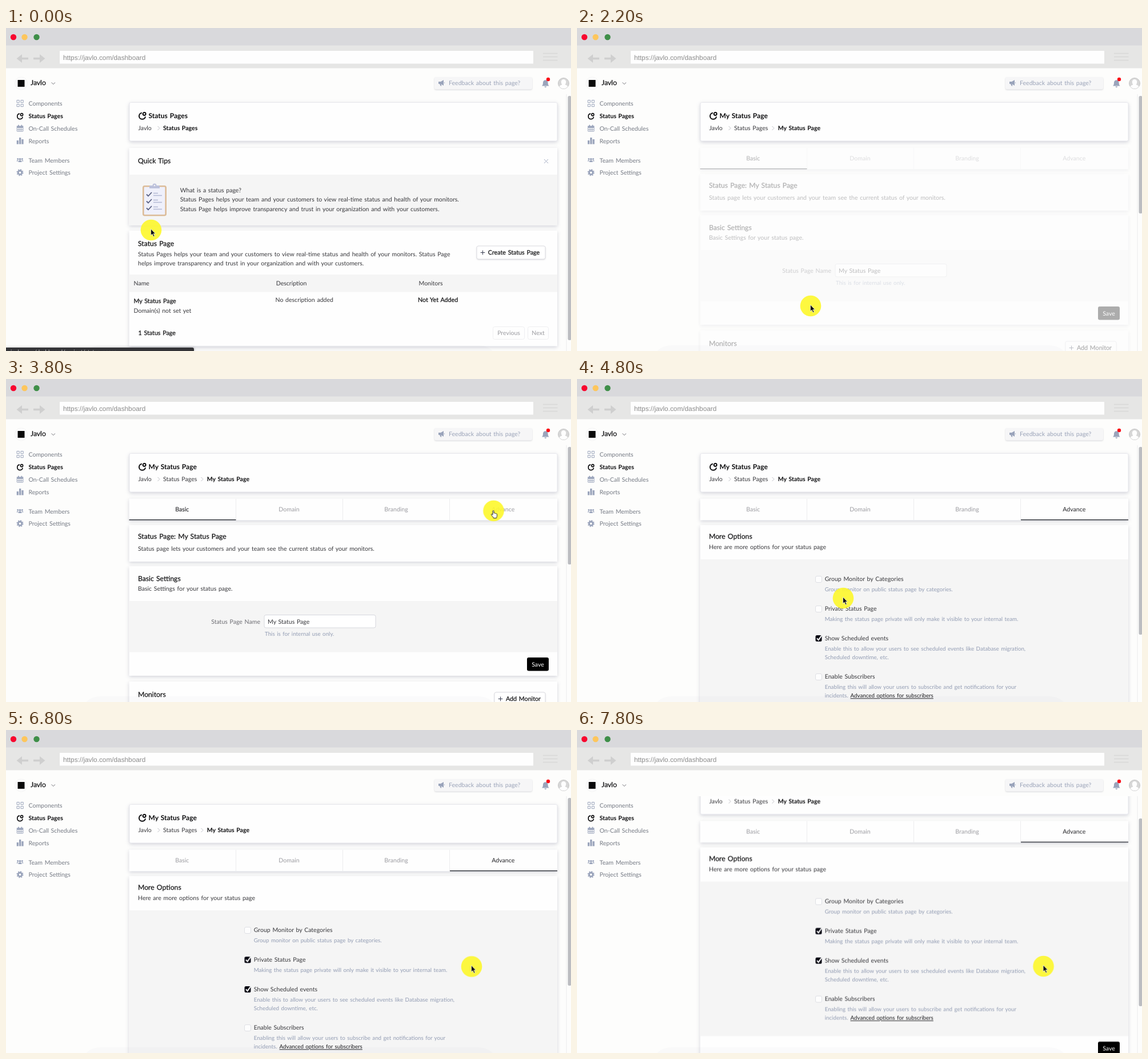
An HTML page for the animation above (8000 ms loop, 989x566 px).

```html
<!DOCTYPE html>
<html lang="en">
<head>
<meta charset="utf-8">
<title>Status page walkthrough</title>
<style>
html, body { margin: 0; width: 100%; height: 100%; overflow: hidden; background: #fdfdfc; }
svg { display: block; width: 989px; height: 566px; }
text {
  font: 10.55px Lato, "Open Sans", sans-serif; word-spacing: 1px; fill: #38383c;
  text-rendering: geometricPrecision; white-space: pre;
}
.url { font: 11.8px "Liberation Sans", Arial, sans-serif; fill: #8b8b8b; word-spacing: 0; }
.nav text { fill: #757a84; }
.nav .on, .bold { font-weight: 700; fill: #0c0c0e; }
.title { font-size: 12px; font-weight: 700; fill: #0c0c0e; }
.h { font-size: 12.2px; fill: #151517; stroke: #151517; stroke-width: .25px; }
.med { font-size: 10.7px; fill: #151517; stroke: #151517; stroke-width: .25px; }
.help { font-size: 9.75px; fill: #939db4; }
.link { fill: #1c1c1f; text-decoration: underline; }
.mute { fill: #9b9ba0; }
.mid { text-anchor: middle; }
.card { fill: #fefefe; filter: drop-shadow(0 2px 3px rgba(60, 66, 100, .22)); }
.pane { fill: #f5f5f5; }
.btn { fill: #fff; stroke: #d3d4da; stroke-width: .8; filter: drop-shadow(0 1px 1px rgba(60, 66, 87, .16)); }
.flat { fill: #fefefe; stroke: #efeff1; }
.ico { fill: #9aa4bb; }
.line { fill: none; stroke: #9aa4bb; stroke-width: 1; }
.ink { fill: none; stroke: #3a3f52; stroke-width: 1; }
.chev { fill: none; stroke: #bfc0c6; stroke-width: 1; }

.list, .detail, .basic, .more, .cursor, .arrow, .hand, .bubble, .tick,
.scroll, .thumb, .tabs, .first, .last { animation: 8s step-end infinite; }

.list { animation-name: list; }
.detail { animation-name: detail; }
.tabs { animation-name: reveal; }
.basic { animation-name: basic; }
.more { animation-name: more; }
.first { animation-name: first; }
.last { animation-name: last; }
.bubble { animation-name: bubble; }
.tick { animation-name: tick; }
.cursor { animation-name: move; }
.arrow { animation-name: arrow; }
.hand { animation-name: hand; }
.scroll { animation-name: scroll; }
.thumb { animation-name: thumb; }

@keyframes list { 0% { opacity: 1 } 22.5% { opacity: 0 } }
@keyframes detail { 0% { opacity: 0 } 22.5% { opacity: 1 } }
@keyframes reveal {
  0% { opacity: 0 } 25% { opacity: .1 } 27.5% { opacity: .32 }
  30% { opacity: .58 } 32.5% { opacity: .82 } 35% { opacity: 1 }
}
@keyframes basic {
  0% { opacity: 0 } 25% { opacity: .1 } 27.5% { opacity: .32 }
  30% { opacity: .58 } 32.5% { opacity: .82 } 35% { opacity: 1 } 52.5% { opacity: 0 }
}
@keyframes more {
  0% { opacity: 0 } 52.5% { opacity: .1 } 55% { opacity: .4 } 57.5% { opacity: .8 } 60% { opacity: 1 }
}
@keyframes first { 0% { fill: #222226; stroke: #222226 } 52.5% { fill: #9b9ba0; stroke: none } }
@keyframes last { 0% { fill: #9b9ba0 } 52.5% { fill: #222226 } }
@keyframes bubble { 0% { opacity: 1 } 5% { opacity: .5 } 7.5% { opacity: 0 } }
@keyframes tick { 0% { opacity: 0 } 72.5% { opacity: 1 } }
@keyframes arrow { 0% { opacity: 1 } 47.5% { opacity: 0 } 55% { opacity: 1 } }
@keyframes hand { 0% { opacity: 0 } 47.5% { opacity: 1 } 55% { opacity: 0 } }
@keyframes move {
  0% { transform: translate(254px, 354px) }
  2.5% { transform: translate(265px, 366px) }
  5% { transform: translate(318px, 416px) }
  7.5% { transform: translate(388px, 472px) }
  10% { transform: translate(409px, 487px) }
  37.5% { transform: translate(440px, 469px) }
  40% { transform: translate(540px, 412px) }
  42.5% { transform: translate(720px, 308px) }
  45% { transform: translate(825px, 248px) }
  47.5% { transform: translate(853.5px, 231px) }
  55% { transform: translate(800px, 262px) }
  57.5% { transform: translate(610px, 334px) }
  60% { transform: translate(466px, 384px) }
  62.5% { transform: translate(425px, 401px) }
  65% { transform: translate(413px, 400px) }
  67.5% { transform: translate(415px, 401px) }
  70% { transform: translate(419px, 403px) }
  72.5% { transform: translate(422px, 405px) }
  75% { transform: translate(421px, 403px) }
  80% { transform: translate(470px, 418px) }
  82.5% { transform: translate(720px, 424px) }
  85% { transform: translate(815px, 414.5px) }
  97.5% { transform: translate(816.5px, 414px) }
}
@keyframes scroll {
  0% { transform: none }
  90% { transform: translateY(-10px) }
  92.5% { transform: translateY(-30.2px) }
  95% { transform: translateY(-44px) }
  97.5% { transform: translateY(-50.4px) }
}
@keyframes thumb {
  0% { height: 428px; y: 119px }
  22.5% { height: 206px; y: 119px }
  52.5% { height: 329px; y: 119px }
  90% { height: 329px; y: 126px }
  92.5% { height: 329px; y: 140px }
  95% { height: 329px; y: 150px }
  97.5% { height: 329px; y: 155px }
}
</style>
</head>
<body>
<svg viewBox="0 0 989 566" xmlns="http://www.w3.org/2000/svg">
<defs>
  <clipPath id="view"><rect x="200" y="116" width="781" height="450"/></clipPath>
  <g id="ring" fill="none" stroke="#0c0c0e" stroke-width="1.7">
    <path d="M5.400 1.700A4.700 4.700 0 1 0 10.600 7.200"/><circle cx="9" cy="3.200" r="2.100"/>
  </g>
  <rect id="box" x=".5" y=".5" width="11" height="11" rx="2.500" fill="#fdfdfd" stroke="#dcdde2" stroke-width=".9"/>
  <g id="checked">
    <rect y=".3" width="11" height="11" rx="2.500" fill="#0a0a14"/>
    <path d="M2.500 5.600l2.700 3 5.300-7.600" fill="none" stroke="#fff" stroke-width="2"/>
  </g>
  <g id="item">
    <path d="M0 0l3 3 6-6.500" fill="none" stroke="#5a6183" stroke-width="1.800"/>
    <path d="M12-2h8M12 2h15" stroke="#b3b9d4" stroke-width="1.600"/>
  </g>
  <path id="gt" class="chev" d="M0-3.500l3.500 3.500-3.500 3.500"/>
  <path id="plus" class="ink" d="M-3.800 0h7.600M0-3.800v7.600"/>
</defs>

<rect width="989" height="566" fill="#fdfdfc"/>

<!-- window chrome -->
<rect width="989" height="31" fill="#d9d9dc"/>
<rect y="30.500" width="989" height="40" fill="#e6e6e5"/>
<circle cx="13" cy="16" r="5.200" fill="#f8062f"/>
<circle cx="32.500" cy="16" r="5.200" fill="#fdc65c"/>
<circle cx="53.500" cy="16" r="5.200" fill="#3f8f49"/>
<g fill="#cfcfcf">
  <path id="back" d="M18.500 53.500l9.500-7.500v5.800h11v3.400H28v5.800z"/>
  <use href="#back" transform="matrix(-1 0 0 1 87 0)"/>
</g>
<rect x="94" y="40" width="829" height="22.500" fill="#fefefe"/>
<text class="url" x="100" y="56">https://javlo.com/dashboard</text>
<path d="M940 44.500h25.500M940 50.500h25.500M940 56.500h25.500" stroke="#d8d8d7" stroke-width="1.300"/>

<!-- top bar -->
<circle cx="26.500" cy="97" r="11" fill="#fff" stroke="#f4f4f4"/>
<rect x="20.500" y="91" width="12" height="12" fill="#0a0a0a"/>
<text class="h" x="43" y="100.300">Javlo</text>
<path d="M79.500 95.500l3.300 3 3.300-3" fill="none" stroke="#77777c"/>
<rect x="750" y="86" width="171" height="21.500" rx="3" fill="#f6f6f7" style="filter:drop-shadow(0 1px 1px rgba(60,66,87,.2))"/>
<g class="ico">
  <path d="M757 94h4l5-3v10l-5-3h-4zM759 98h2.500l1 3.500h-2zM767 94.500a2 2 0 0 1 0 3z"/>
  <path d="M938 101.500q2-1.500 2-6a4.300 4.300 0 0 1 8.600 0q0 4.500 2 6zM942.500 102.500h3.600a1.800 1.800 0 0 1-3.600 0z"/>
</g>
<text x="775" y="99.500" style="fill:#9aa3b8">Feedback about this page?</text>
<circle cx="949" cy="90" r="3.200" fill="#fb0b16"/>
<circle cx="976" cy="97" r="9.500" fill="#d7d7d7" stroke="#bdbdbd" stroke-width=".8"/>
<path d="M968.500 102.500q2-3 5-3.300-2-2-1.800-5a4.300 4.300 0 0 1 8.600 0q.2 3-1.800 5 3 .3 5 3.300a9.500 9.500 0 0 1-15 0z" fill="#fff"/>

<!-- side menu -->
<g class="nav">
  <path class="line" d="M19 126.500h4.200v4.200H19zM26 126.500h4.200v4.200H26zM19 133.500h4.200v4.200H19zM26 133.500h4.200v4.200H26z"/>
  <text x="39.500" y="136.300">Components</text>
  <use href="#ring" x="18.500" y="148.500"/>
  <text class="on" x="39.500" y="158.200">Status Pages</text>
  <path class="ico" d="M18.800 171.500h11.500v3.200H18.800zM21 169.800h1.800v2H21zM26.400 169.800h1.800v2h-1.800z"/>
  <path class="line" d="M19.300 174.500h10.500v6.500H19.300zM19.300 177.800h10.500M22.800 174.500v6.500M26.300 174.500v6.500"/>
  <text x="39.500" y="179.800">On-Call Schedules</text>
  <path class="ico" d="M18.700 197h3.300v6.500h-3.300zM23 192h3.300v11.500H23zM27.300 195h3.300v8.500h-3.300z"/>
  <text x="39.500" y="201.500">Reports</text>
  <g class="ico">
    <circle cx="24.500" cy="229.800" r="1.900"/><circle cx="20.700" cy="229.600" r="1.500"/><circle cx="28.300" cy="229.600" r="1.500"/>
    <path d="M21.600 235v-1.200q0-1.800 2.900-1.800t2.900 1.800v1.200zM18.500 233.500q0-2.300 3-2l-.8 2zM30.500 233.500q0-2.300-3-2l.8 2z"/>
  </g>
  <text x="39.500" y="235.500">Team Members</text>
  <circle cx="24.500" cy="253.300" r="3.300" fill="none" stroke="#9aa4bb" stroke-width="2.800"/>
  <circle cx="24.500" cy="253.300" r="5.200" fill="none" stroke="#9aa4bb" stroke-width="1.600" stroke-dasharray="2.040"/>
  <text x="39.500" y="257.300">Project Settings</text>
</g>

<g clip-path="url(#view)">
<g class="scroll">
  <rect class="card" x="216" y="130.500" width="749" height="67.500" rx="2.500" stroke="#e2e3ea" stroke-width=".8"/>
  <use href="#ring" transform="translate(231.500 146.800) scale(1.180)"/>
  <text x="231.500" y="179.200">Javlo</text>
  <use href="#gt" x="265.500" y="175.500"/>

  <g class="list">
    <text class="title" x="249.500" y="158.200">Status Pages</text>
    <text class="bold" x="275" y="179.200">Status Pages</text>

    <rect class="card" x="215.500" y="210" width="749.500" height="136"/>
    <rect class="pane" x="215.500" y="257" width="749.500" height="89"/>
    <text class="h" x="231" y="237.300">Quick Tips</text>
    <path d="M942 230l7 7M949 230l-7 7" stroke="#a3acc2" stroke-width="1"/>
    <rect x="240.300" y="277.300" width="39.400" height="51" rx="2.500" fill="#eff0fb" stroke="#dcbc98" stroke-width="2.600"/>
    <path d="M251 281v-3.500q0-1.500 1.500-1.500h4q0-3.500 3.500-3.500t3.500 3.500h4q1.500 0 1.500 1.500v3.500z" fill="#bcc1db"/>
    <circle cx="260" cy="276" r="1.300" fill="#f5f5f5"/>
    <use href="#item" x="246" y="291.500"/>
    <use href="#item" x="246" y="303.500"/>
    <use href="#item" x="246" y="315.500"/>
    <text x="304.700" y="287.500">What is a status page?</text>
    <text x="304.700" y="304.300">Status Pages helps your team and your customers to view real-time status and health of your monitors.</text>
    <text x="304.700" y="321.300">Status Page helps improve transparency and trust in your organization and with your customers.</text>

    <rect class="card" x="215.500" y="355" width="749.500" height="202.500"/>
    <text class="h" x="231" y="382">Status Page</text>
    <text x="231" y="399.800">Status Pages helps your team and your customers to view real-time status and health of your monitors. Status Page</text>
    <text x="231" y="415.500">helps improve transparency and trust in your organization and with your customers.</text>
    <rect class="btn" x="824" y="382" width="120" height="23" rx="3"/>
    <use href="#plus" x="834.500" y="393.500"/>
    <text class="med" x="843.800" y="397.300">Create Status Page</text>
    <rect class="pane" x="215.500" y="432" width="749.500" height="30.500"/>
    <text x="223.500" y="451">Name</text>
    <text x="472.700" y="451">Description</text>
    <text x="722.500" y="451">Monitors</text>
    <text class="med" x="223.500" y="482">My Status Page</text>
    <text x="223.500" y="499">Domain(s) not set yet</text>
    <text x="471.500" y="480.300">No description added</text>
    <text class="med" x="721" y="480.300">Not Yet Added</text>
    <text class="med" x="231.500" y="537.800">1 Status Page</text>
    <rect class="flat" x="852.500" y="523.500" width="55" height="22" rx="3"/>
    <rect class="flat" x="913.500" y="523.500" width="36" height="22" rx="3"/>
    <text class="mid mute" x="880" y="537.800">Previous</text>
    <text class="mid mute" x="931.500" y="537.800">Next</text>
  </g>

  <g class="detail">
    <text class="title" x="249.500" y="158.200">My Status Page</text>
    <text x="275" y="179.200">Status Pages</text>
    <use href="#gt" x="341.500" y="175.500"/>
    <text class="bold" x="351.700" y="179.200">My Status Page</text>

    <g class="tabs">
      <rect class="card" x="215.500" y="209.500" width="749.500" height="38"/>
      <path d="M402.500 210v37M589.500 210v37M776.500 210v37" stroke="#ececee"/>
      <text class="mid first" x="308.300" y="231.800" style="stroke-width:.1px">Basic</text>
      <text class="mid mute" x="495.500" y="231.800">Domain</text>
      <text class="mid mute" x="683" y="231.800">Branding</text>
      <text class="mid last" x="870.300" y="231.800">Advance</text>
    </g>

    <g class="basic">
      <path d="M215.500 246.700h187" stroke="#33353d" stroke-width="1.400"/>
      <rect class="card" x="215.500" y="256" width="749.500" height="64"/>
      <text class="h" x="231" y="280.300">Status Page: My Status Page</text>
      <text x="231" y="301.300">Status page lets your customers and your team see the current status of your monitors.</text>

      <rect class="card" x="215.500" y="328" width="749.500" height="192"/>
      <rect class="pane" x="215.500" y="389" width="749.500" height="89.500"/>
      <text class="h" x="231" y="354">Basic Settings</text>
      <text x="231" y="371">Basic Settings for your status page.</text>
      <text x="445" y="428.500" text-anchor="end" style="fill:#6c6c72">Status Page Name</text>
      <rect x="452" y="413.500" width="195" height="22.500" rx="3" fill="#fff" stroke="#d6d7dd"/>
      <text x="458" y="428.500">My Status Page</text>
      <text class="help" x="453" y="450.200">This is for internal use only.</text>
      <rect x="912" y="488" width="38" height="23.500" rx="3"/>
      <text class="mid" x="931" y="503.500" style="fill:#fff">Save</text>

      <rect class="card" x="215.500" y="530" width="749.500" height="60"/>
      <text class="h" x="231" y="557.300">Monitors</text>
      <rect class="btn" x="855" y="549" width="89" height="23" rx="3"/>
      <use href="#plus" x="865.500" y="560.500"/>
      <text class="med" x="875" y="564">Add Monitor</text>
    </g>

    <g class="more">
      <path d="M777 246.700h188" stroke="#33353d" stroke-width="1.400"/>
      <rect class="card" x="215.500" y="256" width="749.500" height="374"/>
      <rect class="pane" x="215.500" y="316" width="749.500" height="270.500"/>
      <text class="h" x="231" y="280.300">More Options</text>
      <text x="231" y="297.600">Here are more options for your status page</text>

      <use href="#box" x="417" y="345"/>
      <text x="433.700" y="354.200">Group Monitor by Categories</text>
      <text class="help" x="433.700" y="371.800">Group monitor on public status page by categories.</text>

      <use href="#box" x="417" y="397"/>
      <use class="tick" href="#checked" x="417.500" y="397"/>
      <text x="433.700" y="406.200">Private Status Page</text>
      <text class="help" x="433.700" y="423.800">Making the status page private will only make it visible to your internal team.</text>

      <use href="#checked" x="417.500" y="448.800"/>
      <text x="433.700" y="458">Show Scheduled events</text>
      <text class="help" x="433.700" y="475.600">Enable this to allow your users to see scheduled events like Database migration,</text>
      <text class="help" x="433.700" y="491.100">Scheduled downtime, etc.</text>

      <use href="#box" x="417" y="516"/>
      <text x="433.700" y="525.200">Enable Subscribers</text>
      <text class="help" x="433.700" y="542.800">Enabling this will allow your users to subscribe and get notifications for your</text>
      <text class="help" x="433.700" y="558.400">incidents. <tspan class="link" x="478.500">Advanced options for subscribers</tspan></text>

      <rect x="912" y="596.500" width="38" height="23.500" rx="3"/>
      <text class="mid" x="931" y="612" style="fill:#fff">Save</text>
    </g>
  </g>
</g>
</g>

<path d="M140 566q8-9 24-10h664q16 1 24 10z" fill="#202040" opacity=".014"/>
<path d="M981 116v450" stroke="#ebebec"/>
<rect class="thumb" x="983.500" y="119" width="6" height="428" rx="2.500" fill="#bcbdc1"/>

<g class="bubble">
  <path d="M0 560h326q3 0 3 3v3H0z" fill="#343437" style="filter:drop-shadow(0 0 2px rgba(0,0,0,.3))"/>
  <text x="8" y="571" style="fill:#c8c8cb;font-size:10px">javlo.com/dashboard/project/status-pages</text>
</g>

<g class="cursor">
  <circle r="18.300" fill="#fdf82c" opacity=".9"/>
  <path class="arrow" d="M-.5-2v11.500l2.600-2.400 2 4.500 2-.9-2-4.300h3.500z" fill="#111" stroke="#fff" stroke-width=".7"/>
  <path class="hand" d="M-1.500 7V.800q0-1.200 1.100-1.200T.700.800V4q1.600-.7 2 .5 1.400-.5 1.800.6 1.500-.3 1.500 1.200v2.500q0 1.500-1 3v1H-.2v-1q-2-2-3.600-4.700-.7-1.300.3-1.600 1-.2 2 1.500z" fill="#fff" stroke="#222" stroke-width="1"/>
</g>
</svg>
</body>
</html>
```
